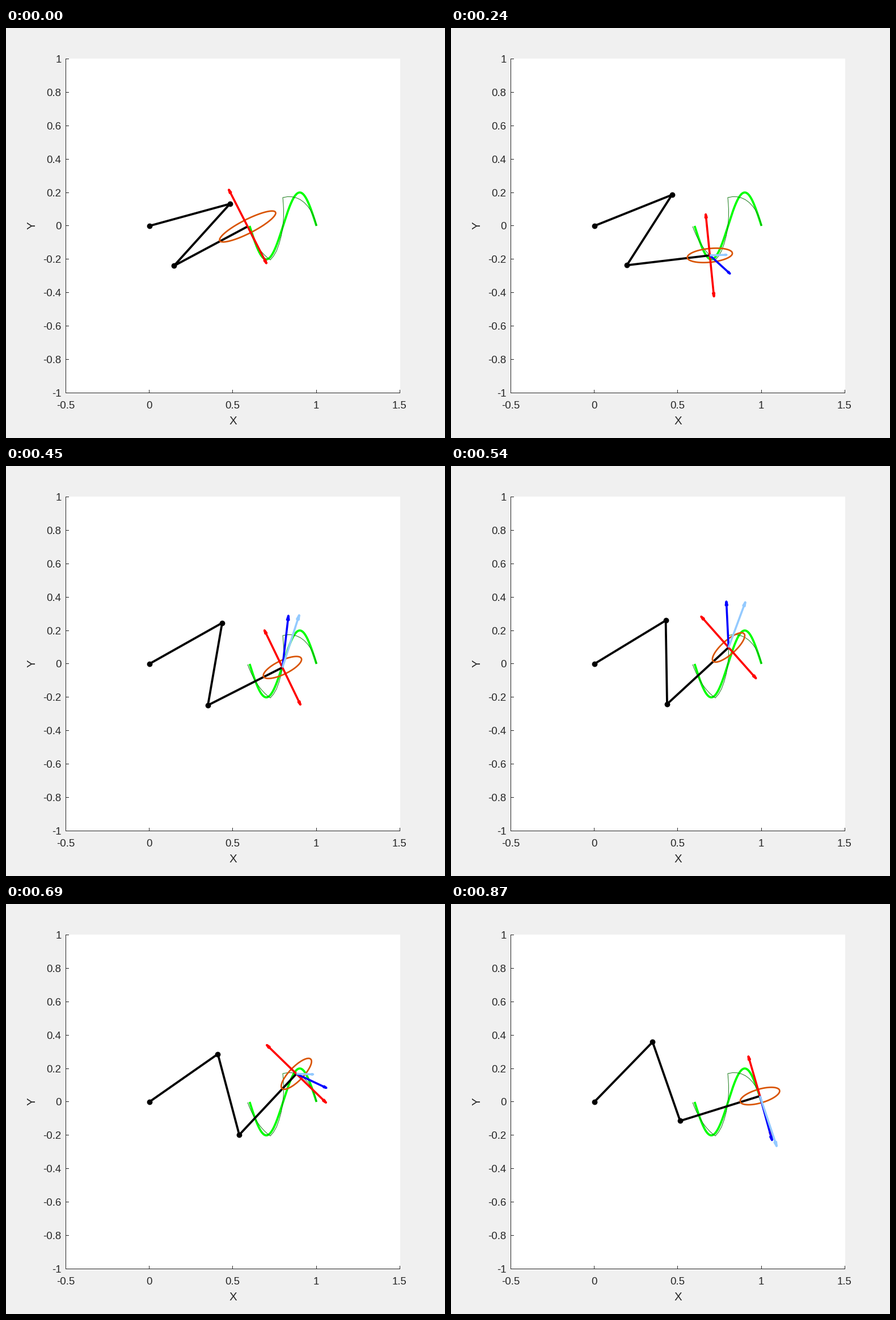
Write a matplotlib script that moves like this. It is 774 by 723 pixels and loops after 900 ms.

```python
import numpy as np
import matplotlib.pyplot as plt
from matplotlib.animation import FuncAnimation

W, H, DPI = 774, 723, 100
PX = 72 / DPI                      # points per pixel
FRAMES, STEP_MS = 30, 30
DT = 4 / FRAMES                    # simulated seconds per frame
UNIT = 294.7                       # pixels per axis unit
LINK = UNIT / 2
LEFT, TOP, SIDE = 105, 54, 590     # plot area
BASE = np.array([252.7, 349])
INK = "#262626"


def hermite(t, start, end, p0, v0, p1, v1):
    """Cubic from p0 to p1 with the given speeds at both ends."""
    h = end - start
    u = (t - start) / h
    p0, v0, p1, v1 = map(np.asarray, (p0, v0, p1, v1))
    ease = u * u * (3 - 2 * u)
    return (p0 + ease * (p1 - p0)
            + h * u * (1 - u) * ((1 - u) * v0 - u * v1))


def follow(pieces, t):
    """Value at time t on a chain of cubic pieces."""
    for piece in pieces:
        if t <= piece[1]:
            break
    return hermite(t, *piece)


# start, end, then position and speed at either end
HAND = [(0, 10, (426, 350), (2.9, 8), (466, 409), (5, 3.5)),
        (10, 12, (466, 409), (6, -5), (477, 393), (5.3, -10.5)),
        (12, 20, (477, 393), (5.3, -12.7), (488, 299), (-1, -9.8)),
        (20, 30, (488, 299), (8.6, -2.4), (547.5, 349), (2.4, 10.8))]
SHOULDER = [(0, 18, 15.3, 0.25, 31.3, 0.4),
            (18, 29, 31.3, 0.4, 45.8, 2.6)]


def arm_points(i):
    """Base, two joints and hand; the second joint closes the triangle."""
    q = np.radians(follow(SHOULDER, i))
    first = BASE + LINK * np.array([np.cos(q), -np.sin(q)])
    hand = follow(HAND, i)
    gap = hand - first
    dist = np.hypot(*gap)
    side = np.array([-gap[1], gap[0]]) / dist
    second = (first + hand) / 2 + side * np.sqrt(LINK**2 - dist**2 / 4)
    return np.array([BASE, first, second, hand])


def arrow_points(start, vec):
    tip = start + vec
    side = np.array([-vec[1], vec[0]]) * 0.018
    back = tip - 0.08 * vec
    return np.array([start, tip, back + side, back - side, tip])


fig = plt.figure(figsize=(W / DPI, H / DPI), dpi=DPI, facecolor="#f0f0f0")
ax = fig.add_axes([0, 0, 1, 1])
ax.set_xlim(0, W)
ax.set_ylim(H, 0)
ax.axis("off")


def line(color, width, z, x=(), y=(), **kw):
    return ax.plot(x, y, color=color, lw=width * PX, zorder=z,
                   solid_capstyle="butt", solid_joinstyle="round", **kw)[0]


def box(x, y, w, h, color, z):
    ax.add_patch(plt.Rectangle((x, y), w, h, fc=color, ec="none", zorder=z))


def label(x, y, text, size=18.67, **kw):
    ax.text(x, y, text, fontsize=size * PX, color=INK,
            family="Liberation Sans", **kw)


def draw_axes():
    bottom = TOP + SIDE - 1
    box(LEFT, TOP, SIDE, SIDE, "white", 0)
    box(LEFT, TOP, 1, SIDE, INK, 1)
    box(LEFT, bottom, SIDE, 1, INK, 1)
    for k in range(11):
        y = TOP + round((SIDE - 1) * k / 10)
        box(LEFT, y, 6, 1, INK, 1)
        label(97.5, y + 7, f"{(5 - k) / 5:g}", ha="right")
    for k in range(5):
        x = LEFT + round((SIDE - 1) * k / 4)
        box(x, bottom - 5, 1, 6, INK, 1)
        label(x, 671, f"{(k - 1) / 2:g}", ha="center")
    label(400, 699, "X", 20.5, ha="center")
    label(46.5, 348.5, "Y", 20.5, ha="center", va="center", rotation=90)


draw_axes()

s = np.linspace(0, 1, 200)
line("#00ff00", 3.8, 2, BASE[0] + UNIT * (0.6 + 0.4 * s),
     BASE[1] + UNIT * 0.2 * np.sin(2 * np.pi * s))
trail = np.array([follow(HAND, i) for i in range(FRAMES + 1)])
line("#006e00", 0.9, 3, *trail.T)

arm = line("black", 3.8, 4)
joints = line("black", 0, 5, marker="o", ms=9.8 * PX, mew=0)
ellipse = line("#d95300", 2.7, 6)
reds = [line("#ff0000", 3.6, 7) for _ in range(2)]
actual = line("#0000ff", 3.6, 8)
wanted = line("#94caff", 3.6, 9)


def update(i):
    pts = arm_points(i)
    hand = pts[3]
    arm.set_data(*pts.T)
    joints.set_data(*pts[:3].T)

    dx, dy = hand - pts[2]
    tilt = np.arctan2(dy, dx) + np.radians(1.1)
    along = np.array([np.cos(tilt), np.sin(tilt)])
    across = np.array([-along[1], along[0]])
    a = np.linspace(0, 2 * np.pi, 121)
    major = 36 + 19.2 * np.exp(-i / 5)
    ring = (hand + major * np.outer(np.cos(a), along)
            + 12.1 * np.outer(np.sin(a), across))
    ellipse.set_data(*ring.T)

    for red, sign in zip(reds, (1, -1)):
        red.set_data(*arrow_points(hand, sign * 0.247 * UNIT * across).T)

    if i == 0:
        actual.set_data([], [])
        wanted.set_data([], [])
    else:
        phase = 2 * np.pi * (i - 0.45) / FRAMES
        goal = UNIT * np.array([0.1, 0.1 * np.pi * np.cos(phase)])
        speed = (follow(HAND, i + 1) - hand) / DT
        actual.set_data(*arrow_points(hand, speed).T)
        wanted.set_data(*arrow_points(hand, goal).T)
    return [arm, joints, ellipse, *reds, actual, wanted]


anim = FuncAnimation(fig, update, frames=FRAMES, interval=STEP_MS,
                     init_func=lambda: update(0), repeat=True, repeat_delay=0)
plt.show()
```
